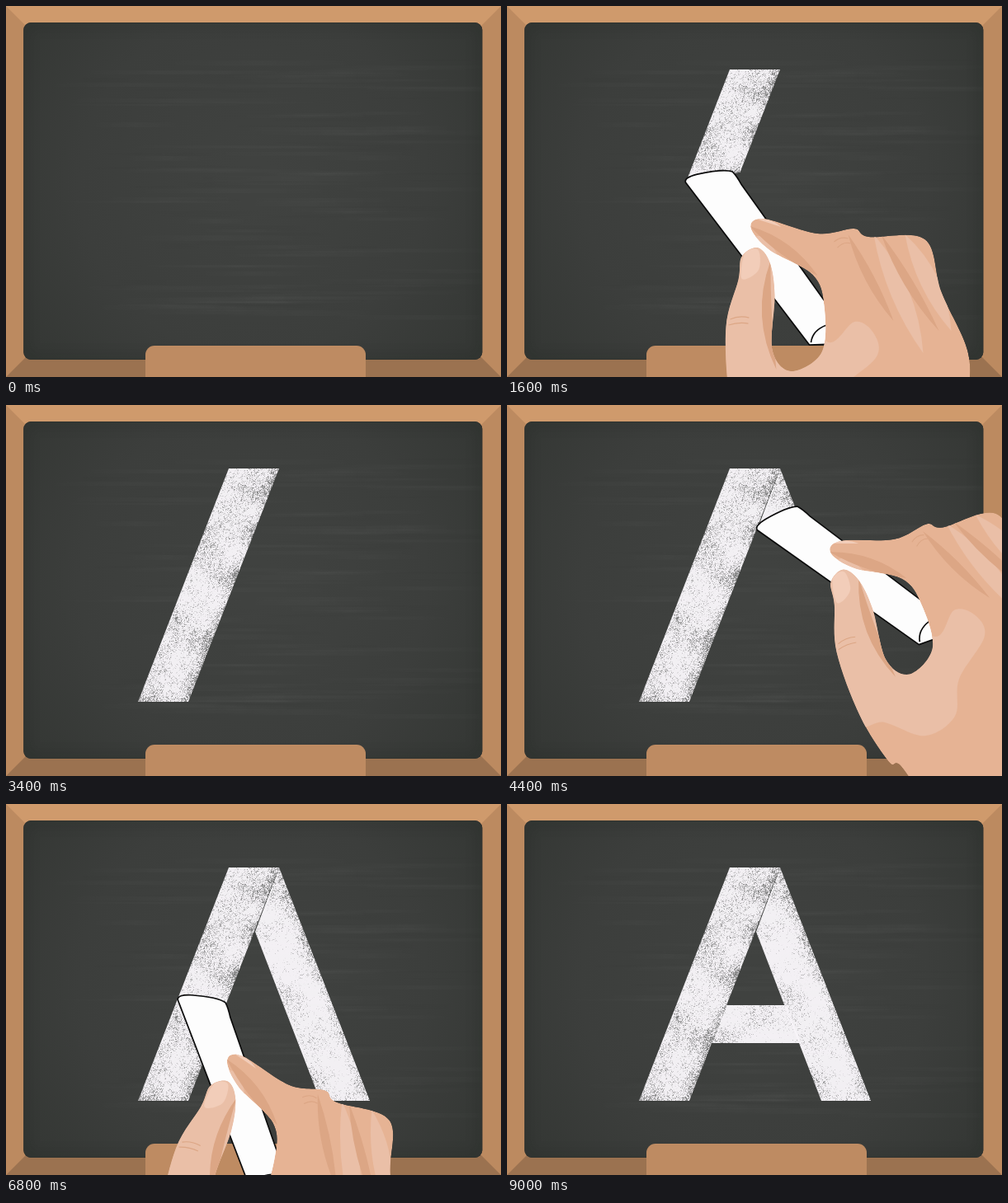
Animation of 600 by 450 pixels, one loop 9.2 s. Source, as an HTML page with a canvas:

```html
<!DOCTYPE html>
<html lang="en">
<head>
<meta charset="utf-8">
<title>Letter A in chalk</title>
<style>
html, body { margin: 0; width: 100%; height: 100%; overflow: hidden; background: #bc8a60; }
canvas { display: block; width: 600px; height: 450px; }
</style>
</head>
<body>
<canvas id="stage" width="600" height="450"></canvas>
<script>
const W = 600, H = 450, LOOP = 9200, STEP = 200;
const ctx = document.getElementById('stage').getContext('2d');

function layer(paint) {
  const c = document.createElement('canvas');
  c.width = W; c.height = H;
  paint(c.getContext('2d'));
  return c;
}
function fill(g, path, color) {
  g.fillStyle = color;
  g.fill(path);
}

// Seeded noise
function rnd(x, y) {
  let h = Math.imul(x + 11, 374761393) + Math.imul(y + 7, 668265263);
  h = Math.imul(h ^ (h >>> 13), 1274126177);
  return ((h ^ (h >>> 16)) >>> 0) / 4294967296;
}
function noise(x, y) {
  const i = Math.floor(x), j = Math.floor(y);
  const ease = v => v * v * (3 - 2 * v);
  const mix = (a, b, k) => a + (b - a) * k;
  const row = n => mix(rnd(i, n), rnd(i + 1, n), ease(x - i));
  return mix(row(j), row(j + 1), ease(y - j));
}

// Path helpers: polygon, smooth closed curve, leaf-shaped fold
function poly(...p) {
  const path = new Path2D();
  for (let i = 0; i < p.length; i += 2) path.lineTo(p[i], p[i + 1]);
  path.closePath();
  return path;
}
function blob(text) {
  const pts = text.split(' ').map(s => s.split(',').map(Number));
  const n = pts.length, path = new Path2D();
  path.moveTo(...pts[0]);
  for (let i = 0; i < n; i++) {
    const [a, b, c, d] = [n - 1, 0, 1, 2].map(k => pts[(i + k) % n]);
    path.bezierCurveTo(
      b[0] + (c[0] - a[0]) / 6, b[1] + (c[1] - a[1]) / 6,
      c[0] - (d[0] - b[0]) / 6, c[1] - (d[1] - b[1]) / 6, c[0], c[1]);
  }
  return path;
}
function leaf(x1, y1, x2, y2, left, right) {
  const len = Math.hypot(x2 - x1, y2 - y1), mx = (x1 + x2) / 2, my = (y1 + y2) / 2;
  const nx = (y1 - y2) / len, ny = (x2 - x1) / len;
  const path = new Path2D();
  path.moveTo(x1, y1);
  path.quadraticCurveTo(mx + nx * left, my + ny * left, x2, y2);
  path.quadraticCurveTo(mx - nx * right, my - ny * right, x1, y1);
  return path;
}

const board = layer(g => {
  g.fillStyle = '#bc8a60';
  g.fillRect(0, 0, W, H);
  fill(g, poly(0, 0, W, 0, W / 2, W / 2), '#cf9a6c');
  fill(g, poly(0, H, W, H, W / 2, H - W / 2), '#9b7250');

  const slate = new Path2D();
  slate.roundRect(21.3, 20, 556, 409, 9);
  g.save();
  g.clip(slate);
  const glow = g.createRadialGradient(300, 215, 30, 300, 215, 360);
  glow.addColorStop(0, '#404240');
  glow.addColorStop(0.55, '#3c3e3c');
  glow.addColorStop(1, '#333633');
  g.fillStyle = glow;
  g.fillRect(0, 0, W, H);
  for (let i = 0; i < 120; i++) {
    const x = 30 + rnd(i, 1) * 400, len = 80 + rnd(i, 2) * 220;
    const tone = i % 3 ? '255,255,255' : '0,0,0';
    const fade = g.createLinearGradient(x, 0, x + len, 0);
    [0, 0.016, 0].forEach((a, k) => fade.addColorStop(k / 2, `rgba(${tone},${a})`));
    g.fillStyle = fade;
    g.fillRect(x, 60 + rnd(i, 3) * 320, len, 2 + rnd(i, 5) * 5);
  }
  g.shadowColor = 'rgba(15,20,15,.6)';
  g.shadowBlur = 16;
  g.lineWidth = 2;
  g.strokeStyle = '#31332f';
  g.stroke(slate);
  g.restore();

  const tray = new Path2D();
  tray.roundRect(169, 412, 267, 60, 11);
  fill(g, tray, '#be8b62');
});

// Letter: left leg, right leg, crossbar
const TOP = 77, BASE = 360, LEAN = 110, LEG = 61, LEFT = 270;
const strokes = [
  poly(LEFT, TOP, LEFT + LEG, TOP, LEFT + LEG - LEAN, BASE, LEFT - LEAN, BASE),
  poly(LEFT + LEG, TOP, LEFT + LEG + LEAN, BASE, LEFT + LEAN + 1, BASE, 302, 155),
  poly(266, 244, 338, 244, 356, 290, 248, 290)
];

// Grainy chalk, thinner towards the right side of each leg and the base
const grain = layer(g => {
  const img = g.createImageData(W, H);
  for (let y = TOP - 2; y < BASE + 2; y++) for (let x = LEFT - LEAN - 4; x < 446; x++) {
    const k = (y - TOP) / (BASE - TOP);
    const first = (x - LEFT + LEAN * k) / LEG;
    const across = first <= 1 ? first : (x - LEFT - LEAN * k) / LEG;
    const wear = Math.max(0, across - 0.75) + Math.max(0, k - 0.85) * 0.6 + (first <= 1 ? 0.06 : -0.08);
    const cover = noise(x / 34, y / 26) * 0.5 + noise(x / 9, y / 9) * 0.25;
    const speck = rnd(x, y) * 0.6 + noise(x / 1.8, y / 1.8) * 0.4;
    const bare = speck - 0.42 - cover * 0.7 + wear;
    img.data.set([248, 245, 249, Math.min(248, Math.max(95, 215 - bare * 330))], (y * W + x) * 4);
  }
  g.putImageData(img, 0, 0);
});

// Hand and chalk, placed by the chalk's left tip
const TIP = { x: 250, y: 122 };
const chalk = new Path2D('M250 125Q248 119 264 115Q297 108 307 112Q312 117 318 128L455 320L400 322Z');
const chalkEnd = new Path2D('M402 319Q404 304 421 298');
const hand = blob('320,450 303,385 299,300 314,243 318,215 337,204 352,222 358,262 355,328 378,354 415,331 418,275 404,237 352,207 329,180 345,169 410,187 454,181 472,191 540,194 560,258 592,330 590,385 562,450 600,800 400,800 342,490');
const palm = blob('290,385 330,402 373,433 416,421 435,378 481,337 478,308 455,294 421,318 380,250 340,190 280,240');
const nail = blob('317,238 322,211 338,207 339,230 324,242');
const creases = new Path2D('M304 291Q315 286 327 289M302 298Q314 294 326 296M430 197Q438 190 447 193M434 204Q442 196 450 199');
const LIGHT = '#eabfa7', SOFT = '#dca685', NAIL = '#f2cdb9';
const folds = [
  [palm, LIGHT],
  [leaf(353, 220, 360, 352, 28, -4), SOFT],
  [leaf(328, 178, 410, 238, 10, 18), SOFT],
  [leaf(335, 169, 366, 179, 0, 7), NAIL],
  [nail, NAIL]
];
for (let i = 0; i < 2; i++) {
  folds.push(
    [leaf(478 + 38 * i, 188, 538 + 34 * i, 332 - 27 * i, 18, 26), LIGHT],
    [leaf(447 + 40 * i, 188, 502 + 55 * i, 293 + 12 * i, 14, 8), SOFT]);
}

function drawHand() {
  fill(ctx, chalk, '#fdfdfd');
  ctx.strokeStyle = '#0b0b0b';
  ctx.lineWidth = 1.7;
  ctx.lineJoin = 'round';
  ctx.stroke(chalk);
  ctx.stroke(chalkEnd);
  ctx.clip(hand);
  fill(ctx, hand, '#e6b394');
  for (const [path, color] of folds) fill(ctx, path, color);
  ctx.strokeStyle = SOFT;
  ctx.lineWidth = 1.2;
  ctx.stroke(creases);
}

// Areas the chalk has passed, in hand space: over its tip, or left of its side
const FAR = 900;
const above = poly(250 - FAR, 124 + FAR / 6, 307 + FAR, 114 - FAR / 6, FAR, -FAR, -FAR, -FAR);
const behind = poly(250 - FAR, 125 - FAR * 1.3, 250 + FAR, 125 + FAR * 1.3, -FAR, FAR * 2, -FAR * 2, -FAR);

// Each pass: keys are time, x, y of the tip; the stroke ends at the key before last
const passes = [
  { turn: 0, size: 1, wipe: above, from: 200, until: 3400, begin: 740,
    keys: [[120, 470, 470], [740, 264.5, 83.5], [2640, 158.4, 365.3], [3400, 215, 475]] },
  { turn: -17.4, size: 0.97, wipe: above, from: 4000, until: 6300, begin: 4000,
    keys: [[4000, 278, 85], [5900, 394.4, 389], [6300, 450, 485]] },
  { turn: 16.3, size: 0.99, wipe: behind, from: 6400, until: 8600, begin: 6800,
    keys: [[6300, 185, 480], [6800, 209, 234.5], [7640, 349, 234.5], [8600, 440, 470]] }
];

function pose({ keys, turn, size }, t) {
  const i = Math.max(1, keys.findIndex(k => k[0] >= t));
  const [t0, x0, y0] = keys[i - 1], [t1, x1, y1] = keys[i];
  const k = (t - t0) / (t1 - t0);
  return new DOMMatrix()
    .translate(x0 + (x1 - x0) * k, y0 + (y1 - y0) * k)
    .rotate(turn)
    .scale(size)
    .translate(-TIP.x, -TIP.y);
}

function draw(t) {
  ctx.drawImage(board, 0, 0);
  passes.forEach((pass, i) => {
    if (t < pass.begin) return;
    ctx.save();
    ctx.clip(strokes[i]);
    if (t < pass.keys.at(-2)[0]) {
      const wiped = new Path2D();
      wiped.addPath(pass.wipe, pose(pass, t));
      ctx.clip(wiped);
    }
    ctx.drawImage(grain, 0, 0);
    ctx.restore();
  });
  const active = passes.find(p => t >= p.from && t < p.until);
  if (active) {
    ctx.save();
    ctx.setTransform(pose(active, t));
    drawHand();
    ctx.restore();
  }
}

const start = performance.now();
function tick(now) {
  const t = Math.max(0, now - start) % LOOP;
  draw(Math.floor(t / STEP) * STEP);
  requestAnimationFrame(tick);
}
draw(0);
requestAnimationFrame(tick);
</script>
</body>
</html>
```
